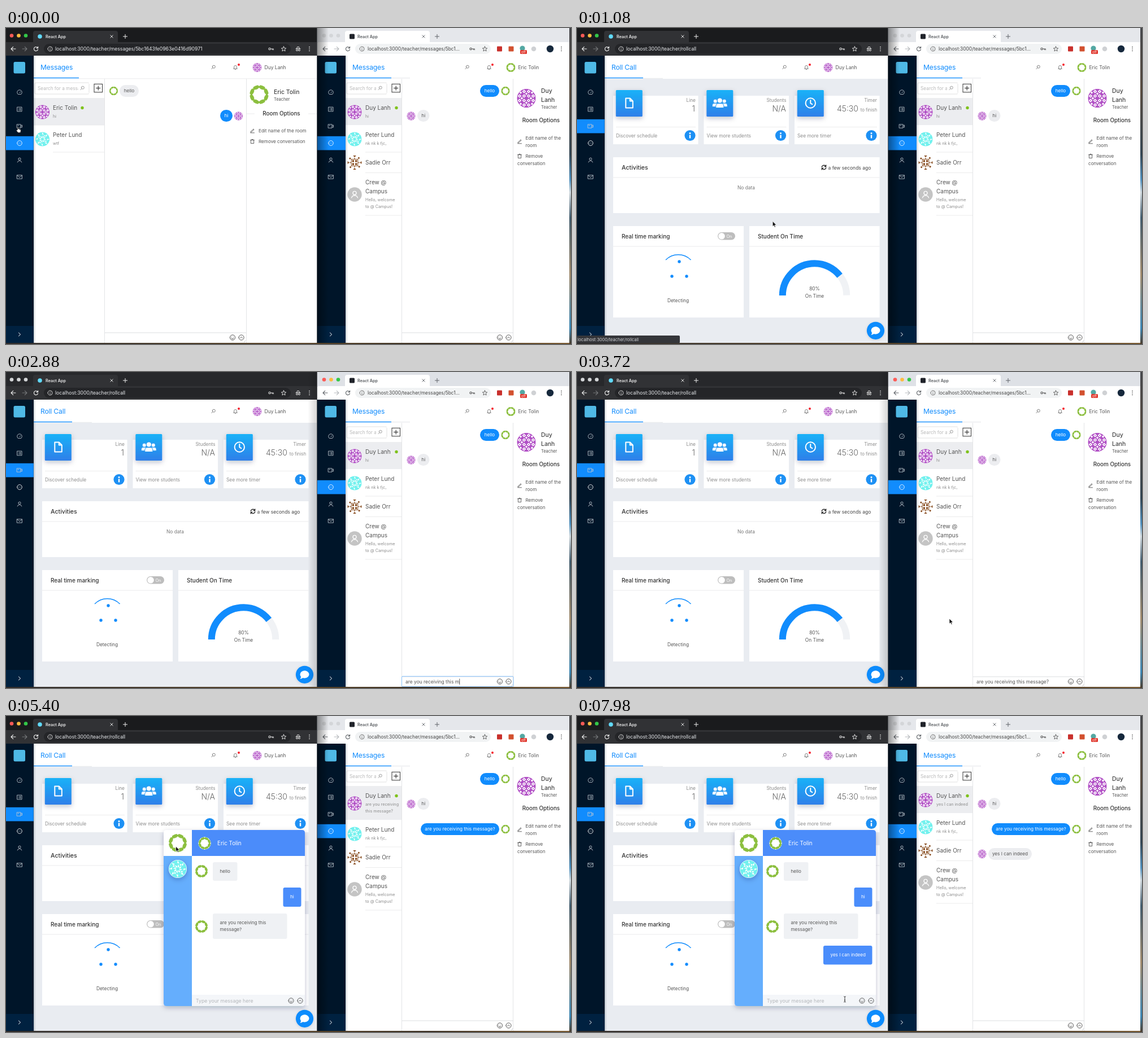
An HTML page that plays this animation: 1000x560 px, repeating every 8 s.

```html
<!DOCTYPE html>
<html lang="en">
<head>
<meta charset="utf-8">
<title>Messages and roll call</title>
<style>
  html, body { margin: 0; width: 100%; height: 100%; overflow: hidden; background: #2a2622; }
  svg { display: block; width: 1000px; height: 560px; }
  text { font-family: Inter, Roboto, sans-serif; white-space: pre; }
</style>
</head>
<body>
<svg id="stage" viewBox="0 0 1000 560"></svg>
<script>
const LOOP = 8000;
const BLUE = '#118cfd', NAVY = '#001529', GREY = '#8c8c8c', INK = '#555';
const TEACHER = 'Duy Lanh', FRIEND = 'Eric Tolin', PUPIL = 'Peter Lund', GUEST = 'Sadie Orr';
const QUESTION = 'are you receiving this message?', REPLY = 'yes I can indeed';
const PATH = 'localhost:3000/teacher/';

// Drawing helpers
const rect = (x, y, w, h, fill, r = 0, extra = '') =>
  `<rect x="${x}" y="${y}" width="${w}" height="${h}" rx="${r}" fill="${fill}" ${extra}/>`;
const disc = (x, y, r, fill, extra = '') => `<circle cx="${x}" cy="${y}" r="${r}" fill="${fill}" ${extra}/>`;
const text = (x, y, s, size = 8.15, fill = INK, anchor = 'start', weight = 400, extra = '') =>
  `<text x="${x}" y="${y}" font-size="${size}" fill="${fill}" text-anchor="${anchor}" font-weight="${weight}" ${extra}>${s}</text>`;
const note = (x, y, s, extra = '') => text(x, y, s, 7.25, GREY, 'start', 400, extra);
const line = (x1, y1, x2, y2, color = '#e6e6e8', w = 0.8) =>
  `<path d="M${x1} ${y1}L${x2} ${y2}" stroke="${color}" stroke-width="${w}"/>`;
const group = (id, body, extra = '') => `<g id="${id}" ${extra}>${body}</g>`;
const ring = (x, y, r) => `M${x - r} ${y}a${r} ${r} 0 1 0 ${2 * r} 0a${r} ${r} 0 1 0 ${-2 * r} 0`;
const avatar = (kind, x, y, r) => `<use href="#${kind}" transform="translate(${x} ${y}) scale(${r / 10})"/>`;
const spin = (n, body) =>
  Array.from({ length: n }, (_, i) => `<g transform="rotate(${i * 360 / n})">${body}</g>`).join('');

const ICONS = {
  back: 'M4 0H-4M-.3 -3.7L-4 0L-.3 3.7',
  forward: 'M-4 0H4M.3 -3.7L4 0L.3 3.7',
  reload: 'M3 -2A3.6 3.6 0 1 0 3.5 1M3.6 -4V-1.4H1',
  info: ring(0, 0, 4) + 'M0 -.3V2M0 -2h.01',
  key: ring(-2.4, 0, 1.7) + 'M-.7 0H4.3V1.8M2.4 0V1.6',
  star: 'M0 -4.2L1.2 -1.3L4.2 -1.1L1.9 .9L2.6 4L0 2.3L-2.6 4L-1.9 .9L-4.2 -1.1L-1.2 -1.3Z',
  hat: 'M-4 -.5H4M-2.2 -1L-1.5 -3.5H1.5L2.2 -1' + ring(-2, 2.2, 1.5) + ring(2, 2.2, 1.5),
  dots: 'M0 -3.3h.01M0 0h.01M0 3.3h.01',
  gauge: 'M-3 3.2A4.3 4.3 0 1 1 3 3.2ZM0 .8L1.8 -1.2',
  table: 'M-4 -3.8H4V3.8H-4ZM-2 -1.6h.01M-2 0h.01M-2 1.6h.01M0 -1.6H2M0 0H2M0 1.6H2',
  camera: 'M-4.5 -3.2H2V3.2H-4.5ZM2 -1.2L4.5 -2V2L2 1.2M-3 -1.2H-1.5',
  chat: ring(0, 0, 4.3) + 'M-2 0h.01M0 0h.01M2 0h.01',
  user: ring(0, -1.8, 2.1) + 'M-3.7 4A3.8 3.8 0 0 1 3.7 4',
  mail: 'M-4.4 -3.2H4.4V3.2H-4.4ZM-4.4 -2.8L0 .7L4.4 -2.8',
  search: ring(.8, -.8, 2.5) + 'M-1 1L-3.2 3.2',
  bell: 'M-3.3 2.6H3.3M-2.4 2.6V-.6A2.4 2.4 0 0 1 2.4 -.6V2.6M-.7 4H.7',
  edit: 'M-3.3 3.8H3.5M-2.5 1.2L1.8 -3.1L3 -2L-1.4 2.1L-2.8 2.4Z',
  trash: 'M-3.4 -2.4H3.4M-1.2 -2.4V-3.6H1.2V-2.4M-2.6 -2.4V3.6H2.6V-2.4',
  smile: ring(0, 0, 4.6) + 'M-1.7 -1.2h.01M1.7 -1.2h.01M-2 1A2.1 2.1 0 0 0 2 1',
  up: ring(0, 0, 4.6) + 'M-2 1L0 -1L2 1',
  more: 'M-1.6 -3L1.6 0L-1.6 3',
  plus: 'M-3.6 0H3.6M0 -3.6V3.6',
  close: 'M-2.2 -2.2L2.2 2.2M2.2 -2.2L-2.2 2.2',
  sync: 'M-3.7 -.5A3.7 3.7 0 0 1 3.2 -1.8M3.7 -4V-1.4H1.2M3.7 .5A3.7 3.7 0 0 1 -3.2 1.8M-3.7 4V1.4H-1.2',
  file: 'M-6 -8.5H1.5L6.5 -3.5V8.5H-6ZM1.5 -8.5V-3.5H6.5',
  clock: ring(0, 0, 8.7) + 'M0 -5V.3L3 2.2',
};
const icon = (name, x, y, color = INK, w = 0.9) =>
  `<path d="${ICONS[name]}" transform="translate(${x} ${y})" fill="none" stroke="${color}" stroke-width="${w}" stroke-linecap="round" stroke-linejoin="round"/>`;

const gradient = (id, stops, dir = 'x2="0" y2="1"') => `<linearGradient id="${id}" ${dir}>` +
  stops.map(([at, c, o = 1]) => `<stop offset="${at}" stop-color="${c}" stop-opacity="${o}"/>`).join('') + '</linearGradient>';
const shadow = (id, dy, blur, alpha) => `<filter id="${id}" x="-30%" y="-30%" width="160%" height="170%">
  <feDropShadow dx="0" dy="${dy}" stdDeviation="${blur}" flood-color="#124" flood-opacity="${alpha}"/></filter>`;

const diamond = (x, y, r) => `M${x} ${y - r}l${r} ${r}l${-r} ${r}l${-r} ${-r}Z`;
const defs = `<defs>
  ${gradient('tile', [[0, '#19b2f8'], [1, '#2f7fe9']])}
  ${gradient('coast', [[0, '#44464a'], [.2, '#55483c'], [.4, '#2f4250'], [.48, '#4d8fbd'], [.52, '#cfd8dd'], [.6, '#3f5a6c'], [.78, '#a08a6c'], [.95, '#3a86b4'], [1, '#4a3a28']])}
  ${gradient('ground', [[0, '#2e2b2a'], [.5, '#5b4528'], [.75, '#3a2e20'], [1, '#7a5a30']], '')}
  ${gradient('castRight', [[0, '#000', .4], [1, '#000', 0]], '')}
  ${gradient('castLeft', [[0, '#000', 0], [1, '#000', .16]], '')}
  ${gradient('edge', [[0, '#001529', .2], [1, '#001529', 0]], '')}
  ${shadow('soft', 3, 4, .26)}${shadow('faint', 1, 2, .14)}
  <clipPath id="round"><circle r="10"/></clipPath>
  <g id="green">${disc(0, 0, 10, '#8cbf3f')}${disc(0, 0, 6.2, '#fff')}
    ${spin(8, '<path d="M-1.8 -5.8L0 -7.3L1.8 -5.8ZM-1.3 -10.2L0 -8.9L1.3 -10.2Z" fill="#fff"/>')}</g>
  <g id="purple" clip-path="url(#round)">${disc(0, 0, 10, '#b252c6')}
    ${spin(4, `<path d="${diamond(2.4, -2.4, 2)}${diamond(2.4, -7.2, 2)}${diamond(7.2, -2.4, 2)}${diamond(6, -6, 1.3)}${diamond(0, -4.8, 1.3)}" fill="#fff"/>
      <path d="${diamond(2.4, -2.4, .8)}${diamond(2.4, -7.2, .7)}${diamond(7.2, -2.4, .7)}" fill="#b252c6"/>`)}</g>
  <g id="cyan" clip-path="url(#round)">${disc(0, 0, 10, '#72f1ee')}
    ${spin(8, '<path d="M0 -9.8L1.7 -6.2L-.6 -6.8ZM.5 -5.5L2 -2.5L0 -1.6Z" fill="#fff"/>')}${spin(4, '<path d="M2.4 -6L4.6 -4.6L2.6 -3.4Z" fill="#fff"/>')}</g>
  <g id="brown" clip-path="url(#round)">${disc(0, 0, 10, '#fff')}
    ${spin(4, `<path d="M-4.9 -4.9H4.9V-4.2H-4.9ZM-3.4 -3.4H-.8V-.8H-3.4ZM-2.2 -9.9L0 -7.4L2.2 -9.9Z${diamond(5.8, -6.4, 1.5)}${diamond(0, -6, .9)}" fill="#85481a"/>`)}</g>
  <g id="blank">${disc(0, 0, 10, '#c4c4c4')}<path d="${ring(0, -2, 2.4)}M-4.4 5A4.5 4.5 0 0 1 4.4 5" fill="none" stroke="#fff" stroke-width="1"/></g>
</defs>`;

// Browser chrome
const lights = (x, colors) => colors.map((c, i) => disc(x + i * 12.5, 13.5, 3.3, c)).join('');
const LIVE = ['#fc5b57', '#fdbc40', '#33c748'];
const strip = (id, x, w, color) => rect(x, 0, w, 26, color, 0, `id="${id}"`);
const browser = (x, w, dark) => {
  const ink = dark ? '#f1f1f1' : '#5f6368', bar = dark ? '#313235' : '#fff';
  return rect(x, 25, w, 24, bar) + rect(x + 48, 5, 150, 24, bar, 4) +
    text(x + 70, 18, 'React App', 7.3, dark ? '#fff' : '#45494d', 'start', 500) +
    icon('close', x + 187, 15, ink) + icon('plus', x + 211, 15, ink, 1) +
    icon('back', x + 13, 37, ink, 1.1) + icon('forward', x + 33, 37, dark ? '#77787b' : '#b5b8bc', 1.1) +
    icon('reload', x + 53, 37, ink, 1.1);
};

// App shell
const MENU = ['gauge', 'table', 'camera', 'chat', 'user', 'mail'];
const mark = (x, y, w, extra = '') => rect(x, y, w, 24.6, BLUE, 0, extra);
const sidebar = (x, w, marks) => rect(x, 49, w, 509, NAVY) + rect(x, 528, w, 30, '#002140') +
  rect(x + 13.5, 60, 20.5, 20.5, '#4fb9e6', 2.5) + marks +
  MENU.map((name, i) => icon(name, x + 24, 114 + i * 30, i === 3 ? '#fff' : '#c3c9d0', .85)).join('') +
  icon('more', x + 24, 543, '#fff', 1) + rect(x + w, 49, 4, 509, 'url(#edge)');
const account = (sx, bx, ax, kind, name) => icon('search', sx, 69.5, '#666', .8) + icon('bell', bx, 69.5, '#666', .8) +
  disc(bx + 6, 65, 2, '#f5222d') + avatar(kind, ax, 70, 8) + text(ax + 13, 73, name, 8.5);
const heading = (x, s, w) => text(x + 12, 74, s, 12.1, BLUE, 'start', 400, 'letter-spacing="-.15"') + rect(x, 87.8, w, 1.4, BLUE);

// Messenger pieces
const searchBox = (x, w) => rect(x, 97, w, 20, '#fff', 2, 'stroke="#d9d9d9" stroke-width=".8"') +
  text(x + 5, 110, 'Search for a message', 8.3, '#b8b8b8') + rect(x + w - 19, 98, 40, 18, '#fff') +
  line(x + w, 99, x + w, 115, '#d9d9d9') + icon('search', x + w - 12, 106.5, '#888', .8) +
  rect(x + w + 9, 99.3, 14.5, 14.5, '#fff', 0, 'stroke="#333" stroke-width="1"') + icon('plus', x + w + 16.2, 106.5, '#222', 1.1);
const contact = (kind, ax, ay, x, y, name, sub = '') => avatar(kind, ax, ay, 12.7) + text(x, y, name, 10) + note(x, y + 14, sub);
const bubble = (x, y, w, s, own) => rect(x, y, w, 21, own ? BLUE : '#ecedf0', 10.4) +
  text(x + w / 2, y + 13.4, s, 8.2, own ? '#fff' : INK, 'middle');
const composer = (x, w) => line(x, 540, x + w, 540, '#d4d6da') + icon('smile', x + w - 24, 548.5, '#444') +
  icon('up', x + w - 8.5, 548.5, '#444') + line(x + w - 4, 557, x + w - 1, 554, '#999', .6);

const inbox = rect(49, 49, 501, 509, '#fff') + heading(49, 'Messages', 80) + line(129, 89.8, 550, 89.8) +
  searchBox(51, 96) + rect(49, 124, 125, 48, '#ecedf0') + contact('purple', 64.5, 149, 83, 145, FRIEND, 'hi') + disc(135, 141.5, 2.7, '#7fc21c') +
  contact('cyan', 64.5, 197, 83, 193, PUPIL, 'wtf') + line(49, 172, 174, 172) + line(83, 220, 174, 220) +
  line(174.5, 90, 174.5, 558, '#dcdde0') + line(425.5, 90, 425.5, 558, '#dcdde0') +
  avatar('green', 190.5, 111.5, 7.7) + bubble(201, 101, 34, 'hello') + bubble(379, 145, 22, 'hi', true) + avatar('purple', 411.5, 156, 7.7) +
  composer(175, 250) + avatar('green', 448, 118, 16.7) + text(474, 117, FRIEND, 10.4, '#444', 'start', 500) + text(474, 129, 'Teacher', 7.4) +
  line(426, 152, 440, 152) + line(535, 152, 550, 152) + text(487.5, 155, 'Room Options', 9.9, '#333', 'middle', 500) +
  icon('edit', 436, 182) + text(447, 185, 'Edit name of the room') + icon('trash', 436, 201) + text(447, 204, 'Remove conversation');

// Roll call page
const people = '<g fill="#fff">' + [[-8, 0, .75], [8, 0, .75], [0, 0, 1]].map(([x, y, k]) =>
  `<path transform="translate(${x} ${y}) scale(${k})" stroke="#2797f1" stroke-width="1" d="${ring(0, -4.5, 4.6)}M-7 8.5V5Q-7 .8 -2.5 .8H2.5Q7 .8 7 5V8.5Z"/>`).join('') + '</g>';
const statCard = (x, label, value, footer, glyph) => rect(x, 120, 150.5, 86, '#fff') +
  rect(x + 4.8, 110, 47, 47, 'url(#tile)', 1.5, 'filter="url(#soft)"') + `<g transform="translate(${x + 28.3} 133)">${glyph}</g>` +
  text(x + 146, 131, label, 8.4, GREY, 'end') + value + line(x + 5, 175.5, x + 146, 175.5) + text(x + 5, 194, footer, 8.4, GREY) +
  disc(x + 136, 190.5, 9.6, '#1d90f4') + rect(x + 134.8, 189.4, 2.4, 6, '#fff') + disc(x + 136, 186.4, 1.5, '#fff');
const big = (x, s) => text(x, 147.8, s, 14, '#666', 'end', 300);
const panel = (x, y, w, h, title, size = 10) => rect(x, y, w, h, '#fff') + line(x, y + 36, x + w, y + 36) +
  text(x + 15, y + 21.5, title, size, '#333', 'start', 500);
const arc = 'M363.8 474A56.7 56.7 0 0 1 477.2 474';
const rollCall = rect(49, 90, 501, 468, '#e9ecf1') + rect(49, 49, 501, 41, '#fff') + heading(49, 'Roll Call', 68) + line(117, 89.3, 152, 89.3, '#dfe1e5') +
  statCard(64, 'Line', big(209, '1'), 'Discover schedule', icon('file', 0, 0, '#fff', 2)) +
  statCard(224.5, 'Students', big(370, 'N/A'), 'View more students', people) +
  statCard(385, 'Timer', big(498, '45:30') + text(531, 147.8, 'to finish', 7.8, GREY, 'end'), 'See more timer', icon('clock', 0, 0, '#fff', 2)) +
  panel(64, 229, 471.5, 99, 'Activities', 10.6) + icon('sync', 437, 247, '#222', 1.3) + text(444.5, 250.5, 'a few seconds ago', 8.5, '#444') +
  text(299.5, 285.5, 'No data', 8.4, '#777', 'middle') +
  panel(64, 351, 231, 162, 'Real time marking') + panel(305, 351, 230.5, 162, 'Student On Time') +
  rect(249, 362, 31, 13.6, '#bdbdbd', 6.8) + disc(256, 368.8, 5.8, '#fff') + text(264.5, 371.6, 'On', 7.2, '#fff') +
  `<path d="M157 411A31.4 31.4 0 0 1 201.5 411" fill="none" stroke="${BLUE}" stroke-width="1.5"/>` +
  disc(181, 414, 2.7, BLUE) + disc(168, 440, 2.7, BLUE) + disc(194, 440, 2.7, BLUE) + text(179, 486, 'Detecting', 8.4, INK, 'middle') +
  `<g fill="none" stroke-width="12"><path id="track" d="${arc}" pathLength="100" stroke="#f0f2f5"/><path id="meter" d="${arc}" pathLength="100" stroke="${BLUE}"/></g>` +
  text(420.5, 465, '80%', 8.4, INK, 'middle') + text(420.5, 478, 'On Time', 8.4, INK, 'middle') +
  disc(528.5, 536.3, 15.6, BLUE, 'filter="url(#faint)"') +
  '<path d="M520.5 536A8 6.6 0 1 1 525.5 542Q523 544 520.5 543.6Q522.4 541.8 522 540Q520.5 538 520.5 536Z" fill="#fff"/>';

// Floating chat
const box = (x, y, w, h, lines, own) => rect(x, y, w, h, own ? '#4a8dfb' : '#eff1f4', 3) +
  lines.map((s, i) => text(x + 12.5, y + 19.4 + i * 12, s, 8.1, own ? '#fff' : INK)).join('');
const popup = rect(279, 202, 250, 312, '#fff', 5, 'filter="url(#soft)"') +
  '<path d="M279 248H329V514H284Q279 514 279 509Z" fill="#65aefd"/><path d="M329 202H524Q529 202 529 207V248H329Z" fill="#4b8cfa"/>' +
  avatar('green', 304, 225, 16) + disc(304, 271, 16, '#fff', 'filter="url(#soft)"') + avatar('cyan', 304, 271, 15.5) +
  disc(351.5, 225.5, 11, '#fff') + avatar('green', 351.5, 225.5, 10.7) + text(374, 228.7, FRIEND, 9.9, '#fff') +
  avatar('green', 346, 275, 11) + box(366, 259, 43.5, 33, ['hello']) + box(490.5, 304, 32, 34, ['hi'], true) +
  avatar('green', 346, 373, 11) + box(366, 350, 131.5, 45, ['are you receiving this', 'message?']) +
  group('chatReply', box(436, 407, 86.5, 33.5, [REPLY], true)) +
  '<path d="M329 494H529V509Q529 514 524 514H329Z" fill="#f4f6f9"/>' +
  text(336, 508, 'Type your message here', 8.7, '#b3b6ba', 'start', 400, 'id="hint"') +
  text(336, 508, '', 8.7, INK, 'start', 400, 'id="chatText"') + group('chatCaret', line(0, 499, 0, 510, '#333')) +
  icon('smile', 504.5, 504.5, '#444') + icon('up', 520.5, 504.5, '#444');

const url = (id, s) => text(87, 40.3, s, 8.62, '#e8eaed', 'start', 400, `id="${id}"`);
const leftWindow = strip('leftStrip', 0, 550, '#1a1b1d') + browser(0, 550, true) + rect(67, 28, 437, 18, '#242528', 9) + disc(60, 15, 3.8, '#61dafb') +
  group('leftLive', lights(10, LIVE)) + group('leftIdle', lights(10, Array(3).fill('#d3d5d7'))) +
  icon('info', 78, 37, '#ddd') + url('urlInbox', PATH + 'messages/5bc1643fe0963e0416d90971') + url('urlRoll', PATH + 'rollcall') +
  icon('key', 469, 37, '#ddd', 1.1) + icon('star', 491.5, 37, '#eee') + icon('hat', 517, 37, '#eee') + icon('dots', 537, 37, '#eee', 1.7) +
  group('inbox', inbox) + group('roll', rollCall) + account(367, 406, 444.5, 'purple', TEACHER) +
  sidebar(0, 48.8, mark(0, 161.8, 48.8, 'id="markRoll"') + mark(0, 191.8, 48.8, 'id="markChat"')) +
  group('popup', popup) +
  group('tip', '<path d="M57 170.5L53.5 174L57 177.5Z" fill="#2d2f33"/>' + rect(57, 164.5, 41.5, 20, '#2d2f33', 2.5) + text(61, 177.8, 'Roll Call', 8.4, '#fff')) +
  group('status', rect(0, 545, 182, 13.5, '#35363a', 2) + text(1, 554.5, PATH + 'rollcall', 7.5, '#d5d7da'));

const contacts = contact('cyan', 617, 197, 636, 193, PUPIL, 'nk nk k fjc,') + line(636, 220, 700, 220) +
  contact('brown', 617, 238.5, 636, 241.5, GUEST) + line(636, 256.5, 700, 256.5) +
  avatar('blank', 617, 295, 12.7) + text(636, 277, 'Crew @', 10) + text(636, 293, 'Campus', 10) +
  note(636, 307, 'Hello, welcome') + note(636, 319, 'to @ Campus!') + line(636, 332, 700, 332);
const rightWindow = rect(551, 0, 446, 558, '#fff') + strip('rightStrip', 551, 446, '#dee1e6') + browser(552, 445, false) +
  rect(618, 28, 240, 18, '#f1f3f4', 9) + rect(608, 10.5, 9, 9, '#20232a', 1.5) +
  group('rightLive', lights(563, LIVE)) + group('rightIdle', lights(563, Array(3).fill('#d3d5d8'))) +
  icon('info', 630, 37, '#666') + text(640, 40.3, PATH + 'messages/5bc1...', 8.35, '#444') +
  icon('key', 825, 37, '#555', 1.1) + icon('star', 847.5, 37, '#555') +
  rect(869, 32.5, 9, 9, '#c9302c', 1) + rect(889.5, 32.5, 9, 9, '#d2502f', 1) + disc(914, 36, 4.6, '#53a8a3') +
  rect(910, 39, 12, 7, '#e0352b', 1.5) + text(916, 44.8, 'off', 6, '#fff', 'middle') + disc(934, 37, 4.3, '#cfd1d4') +
  disc(963, 37, 6.2, '#16283c') + icon('dots', 983, 37, '#555', 1.7) +
  heading(601, 'Messages', 81) + rect(682, 88.3, 33, .9, '#dfe1e5') + account(816, 855, 893.5, 'green', FRIEND) + searchBox(603, 71) +
  rect(601, 124, 99, 48, '#ecedf0', 0, 'id="row"') + group('rowAvatar', avatar('purple', 617, 149, 12.7)) +
  text(636, 145, TEACHER, 10) + disc(691, 141.5, 2.7, '#7fc21c') + note(636, 159, '', 'id="sub1"') + note(636, 171, 'this message?', 'id="sub2"') +
  group('contacts', contacts) + line(700.5, 90, 700.5, 558, '#dcdde0') + line(897.5, 90, 897.5, 558, '#dcdde0') +
  bubble(839, 101, 34, 'hello', true) + avatar('green', 884, 111.5, 7.7) + avatar('purple', 717, 156, 7.7) + bubble(728, 145, 21.5, 'hi') +
  group('sent', bubble(734, 190, 139, QUESTION, true) + avatar('green', 884, 200.5, 7.7)) +
  group('answer', avatar('purple', 717, 244.5, 7.7) + bubble(728, 234, 77, REPLY)) +
  composer(701, 197) + rect(700.5, 539.3, 197.5, 18.2, 'none', 1.5, 'id="focus" stroke="#7dbdfb" stroke-width=".9"') +
  text(707, 552, '', 8.45, INK, 'start', 400, 'id="draft"') + group('caret', line(0, 543.5, 0, 554, '#333')) +
  avatar('purple', 921, 124.5, 16.7) + text(947, 115, TEACHER.slice(0, 3), 10.4, '#444', 'start', 500) + text(947, 131, TEACHER.slice(4), 10.4, '#444', 'start', 500) +
  text(947, 143, 'Teacher', 7.4) + text(947, 167, 'Room Options', 9.9, '#333', 'middle', 500) +
  icon('edit', 909, 201) + text(919.5, 197.5, 'Edit name of the') + text(919.5, 210.5, 'room') +
  icon('trash', 909, 227) + text(919.5, 230, 'Remove') + text(905, 243, 'conversation') +
  sidebar(551, 50, mark(551, 191.8, 50));

const pointers =
  group('arrow', '<path d="M0 0V9.2L2.2 7.3L3.6 10.6L5.2 9.9L3.8 6.7H6.7Z" fill="#111" stroke="#fff" stroke-width=".7"/>') +
  group('hand', '<path d="M-.8 5.4V1Q0 -.4 .8 1V4Q2 3.2 2.5 4.4Q3.5 3.7 4 4.8Q5.2 4.4 5.2 5.8V8Q5 9.2 4.4 10.4H.2L-2.9 6.6Q-2.8 5.2 -1.6 6.2Z" fill="#fff" stroke="#111" stroke-width=".8"/>') +
  group('beam', '<path d="M-1.8 -5Q0 -5 0 -3.8Q0 -5 1.8 -5M0 -3.8V3.8M-1.8 5Q0 5 0 3.8Q0 5 1.8 5M-1 1.5H1" fill="none" stroke="#222" stroke-width=".9"/>');

document.getElementById('stage').innerHTML = defs + rect(0, 558, 1000, 2, 'url(#ground)') + rect(997, 0, 3, 560, 'url(#coast)') +
  leftWindow + rightWindow + rect(550, 0, 1, 558, '#55585c') +
  rect(551, 0, 20, 558, 'url(#castRight)', 0, 'id="shadeRight"') + rect(534, 0, 16, 558, 'url(#castLeft)', 0, 'id="shadeLeft"') + pointers;

// Timeline
const el = {};
document.querySelectorAll('#stage [id]').forEach(node => el[node.id] = node);
const show = (id, on) => el[id].setAttribute('visibility', on ? 'visible' : 'hidden');
const fade = (id, v) => el[id].setAttribute('opacity', v);
const progress = (t, from, to) => Math.min(1, Math.max(0, (t - from) / (to - from)));
const easeOut = k => 1 - (1 - k) ** 3;
const smooth = k => k * k * (3 - 2 * k);
const typed = (s, t, from, step) => s.slice(0, Math.max(0, Math.floor((t - from) / step)));
const put = (node, s) => { if (node.textContent !== s) node.textContent = s; };

// time, x, y, pointer used until the next entry
const TRAIL = [
  [0, 21, 175, 'hand'], [820, 21, 175, 'arrow'], [1380, 745, 548, 'beam'], [1700, 745, 548, ''],
  [3380, 745, 548, 'arrow'], [3720, 659, 437, 'arrow'], [4150, 530.5, 533, 'arrow'], [4700, 530.5, 533, 'arrow'],
  [5250, 300.5, 231, 'arrow'], [5600, 300.5, 231, 'arrow'], [6050, 474, 502, 'beam'], [6200, 474, 502, ''],
  [7350, 474, 502, 'beam'], [LOOP, 474, 502, 'beam'],
];
const movePointer = t => {
  const i = TRAIL.findIndex(p => p[0] > t) - 1;
  const [t0, x0, y0, shape] = TRAIL[i], [t1, x1, y1] = TRAIL[i + 1];
  const k = smooth(progress(t, t0, t1));
  for (const id of ['arrow', 'hand', 'beam']) show(id, id === shape);
  if (shape) el[shape].setAttribute('transform', `translate(${x0 + (x1 - x0) * k} ${y0 + (y1 - y0) * k})`);
};
const placeCaret = (id, node, x, on) => {
  show(id, on);
  if (on) el[id].setAttribute('transform', `translate(${x + node.getComputedTextLength() + .6} 0)`);
};

function draw(t) {
  const onRoll = t >= 450, rightActive = t >= 1480 && t < 4190;
  const sent = t >= 3880, answered = t >= 7230;

  show('inbox', !onRoll); show('urlInbox', !onRoll);
  show('roll', onRoll); show('urlRoll', onRoll);
  const menu = progress(t, 450, 750);
  fade('markRoll', menu); fade('markChat', 1 - menu);
  show('status', t >= 180 && t < 1100);
  fade('tip', progress(t, 240, 360) * (1 - progress(t, 920, 1040)));

  const sweep = 100 * easeOut(progress(t, 620, 1150));
  el.track.setAttribute('stroke-dasharray', `${sweep} 200`);
  el.meter.setAttribute('stroke-dasharray', `${sweep * .79} 200`);
  show('track', sweep > 0); show('meter', sweep > 0);

  show('leftLive', !rightActive); show('leftIdle', rightActive);
  show('rightLive', rightActive); show('rightIdle', !rightActive);
  show('shadeRight', !rightActive); show('shadeLeft', rightActive);
  el.leftStrip.setAttribute('fill', rightActive ? '#27282b' : '#1a1b1d');
  el.rightStrip.setAttribute('fill', rightActive ? '#dee1e6' : '#e5e7eb');

  const focused = t >= 1500 && t < 3340;
  show('focus', focused);
  put(el.draft, sent ? '' : typed(QUESTION, t, 1704, 48));
  placeCaret('caret', el.draft, 707, focused);
  show('sent', sent); show('answer', answered);

  const tall = sent && !answered, shift = tall ? 12 : 0;
  put(el.sub1, answered ? REPLY : sent ? 'are you receiving' : 'hi');
  show('sub2', tall);
  el.row.setAttribute('height', 48 + shift);
  el.rowAvatar.setAttribute('transform', `translate(0 ${shift / 2})`);
  el.contacts.setAttribute('transform', `translate(0 ${shift})`);

  const open = progress(t, 4430, 4730), scale = .89 + .11 * easeOut(open);
  fade('popup', open);
  el.popup.setAttribute('transform', `translate(529 514) scale(${scale}) translate(-529 -514)`);
  put(el.chatText, answered ? '' : typed(REPLY, t, 6200, 52));
  fade('hint', el.chatText.textContent ? 0 : 1);
  placeCaret('chatCaret', el.chatText, 336, t >= 6100 && t < 7230);
  fade('chatReply', t >= 7200 ? 1 : 0);

  movePointer(t);
}

const start = performance.now();
const tick = () => {
  draw((performance.now() - start) % LOOP);
  requestAnimationFrame(tick);
};
tick();
</script>
</body>
</html>
```
